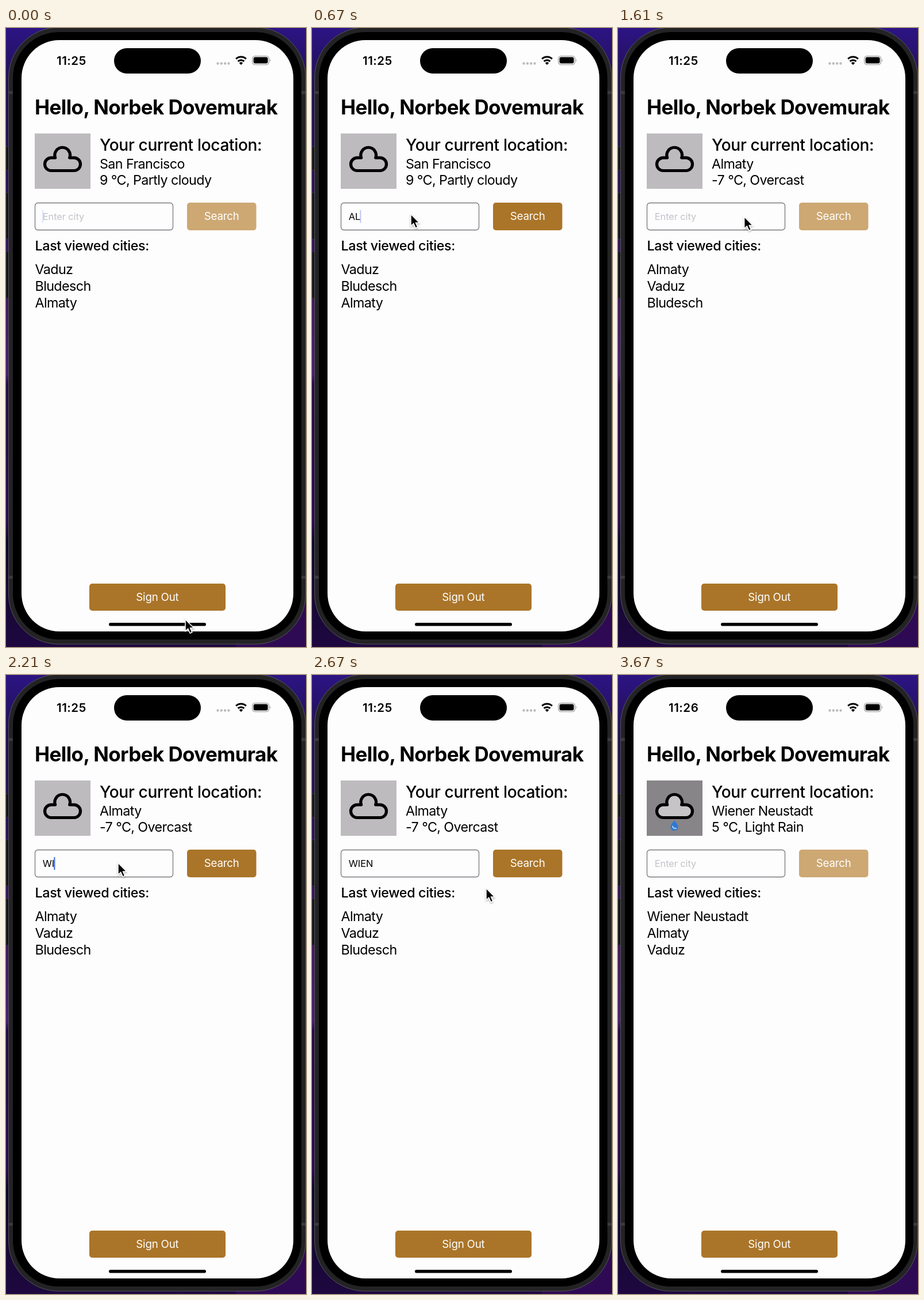
Recreate the animation shown at these times as an HTML page. Size 522 by 1074 pixels, loop 3700 ms.

```html
<!DOCTYPE html>
<html lang="en">
<head>
<meta charset="utf-8">
<style>
  html, body { margin: 0; width: 100%; height: 100%; overflow: hidden; background: #1e0840; }
  svg { display: block; width: 522px; height: 1074px; }
  text { font: 400 23.3px Inter, sans-serif; font-optical-sizing: none; letter-spacing: -.6px; white-space: pre; }
  .title { font-size: 35px; font-weight: 700; letter-spacing: -.6px; }
  .head { font-size: 28.1px; font-weight: 500; letter-spacing: -.35px; }
  .sub { font-weight: 500; letter-spacing: -.36px; }
  .clock { font-size: 20.5px; font-weight: 600; letter-spacing: .5px; }
  .button { font-size: 18.7px; letter-spacing: -.2px; fill: #fff; text-anchor: middle; }
  .field { font-size: 16.4px; letter-spacing: -.1px; }
</style>
</head>
<body>
<svg viewBox="0 0 522 1074">
  <defs>
    <linearGradient id="wall" x2="0" y2="1">
      <stop offset="0" stop-color="#2c1484"/>
      <stop offset=".1" stop-color="#20104f"/>
      <stop offset=".3" stop-color="#2c1258"/>
      <stop offset=".45" stop-color="#43185f"/>
      <stop offset=".56" stop-color="#4b1d73"/>
      <stop offset=".575" stop-color="#260a45"/>
      <stop offset=".8" stop-color="#2c0a50"/>
      <stop offset=".83" stop-color="#0d0726"/>
      <stop offset="1" stop-color="#1e0840"/>
    </linearGradient>
    <filter id="soft"><feGaussianBlur stdDeviation=".6"/></filter>
    <filter id="shadow" x="-50%" y="-50%" width="200%" height="200%">
      <feDropShadow dx="0" dy="1.5" stdDeviation="1.5" flood-opacity=".35"/>
    </filter>
  </defs>

  <rect width="522" height="1074" fill="url(#wall)"/>
  <rect x="400" y="900" width="122" height="174" fill="#2f0a54"/>
  <path d="M0 206H5V247H0ZM0 286H5V366H0ZM0 388H5V469H0Z" fill="#141318" stroke="#34323a"/>
  <rect x="4.5" y="-1" width="517" height="1070" rx="87" fill="#232325" stroke="#56545a"/>
  <path d="M5 112h8M5 953h8M513 112h8M513 953h8" stroke="#3b3a3d" stroke-width="5"/>
  <rect x="12" y="7" width="502" height="1054" rx="80"/>
  <rect x="27" y="21" width="473" height="1026" rx="66" fill="#fefdfe"/>

  <text id="clock" class="clock" x="88" y="63.6"/>
  <rect x="188" y="35" width="151" height="44" rx="22"/>
  <path d="M368.5 61.5h.01m6.3 0h.01m6.3 0h.01m6.3 0h.01" stroke="#bcbbbe" stroke-width="4.4" stroke-linecap="round"/>
  <g fill="none" stroke="#000" stroke-width="3">
    <path d="M400.2 53.6a12.6 12.6 0 0 1 17.6 0M403.6 57.8a7.8 7.8 0 0 1 10.8 0"/>
    <path d="M409 64l-3.2-3.3a4.4 4.4 0 0 1 6.4 0Z" fill="#000" stroke="none"/>
  </g>
  <rect x="428.6" y="48.6" width="29" height="15" rx="4.8" fill="none" stroke="#a3a2a5" stroke-width="1.3"/>
  <rect x="430.6" y="50.6" width="25" height="11" rx="3"/>
  <path d="M459.3 53.5q2.4 2.6 0 5.2Z" fill="#a3a2a5"/>

  <text class="title" x="50" y="150">Hello, Norbek Dovemurak</text>
  <rect id="tile" x="50" y="183" width="97" height="96"/>
  <g filter="url(#soft)">
    <path id="cloud" d="M78.7 247.5a11.2 11.2 0 0 1 0-22.4H85.7A13.3 13.3 0 1 1 110.7 225.1H118.3a11.2 11.2 0 0 1 0 22.4Z" stroke="#000" stroke-width="5.2" stroke-linejoin="round"/>
  </g>
  <g id="drop">
    <path d="M98 252.5q6.6 7 6.6 11.2a6.6 6.3 0 0 1-13.2 0q0-4.2 6.6-11.2Z" fill="#2f78d2"/>
    <path d="M95 262.5q1 4.5 6 3.5" fill="none" stroke="#a9d2f5" stroke-width="2" stroke-linecap="round"/>
  </g>

  <text class="head" x="163" y="213">Your current location:</text>
  <text id="city" x="163" y="243.6"/>
  <text id="weather" x="163" y="272.4"/>

  <rect x="50.5" y="303.5" width="240" height="47" rx="5" fill="none" stroke="#79777c" stroke-width="1.3"/>
  <text id="field" class="field" x="63.8" y="333"/>
  <rect id="caret" y="316" width="2" height="22" fill="#3d62dd"/>
  <rect id="search" x="315" y="303" width="120.5" height="48" rx="5"/>
  <text class="button" x="375.2" y="333.4">Search</text>

  <text class="sub" x="50.5" y="386">Last viewed cities:</text>
  <text id="row0" x="50.5" y="427"/>
  <text id="row1" x="50.5" y="455.8"/>
  <text id="row2" x="50.5" y="484.6"/>

  <rect x="145" y="964" width="237" height="47" rx="5" fill="#aa7529"/>
  <text class="button" x="263.4" y="994.3">Sign Out</text>
  <rect x="179" y="1032" width="169" height="5.6" rx="2.8"/>

  <g id="pointer" filter="url(#shadow)">
    <path d="M0 0V20.5L4.7 16.2L8.2 24L11.8 22.5L8.5 14.9H14.8Z" stroke="#fff" stroke-width="1.5"/>
  </g>
</svg>
<script>
const LOOP = 3700;
const el = id => document.getElementById(id);

const results = [
  { at: 0, city: 'San Francisco', weather: '9 °C, Partly cloudy', rows: ['Vaduz', 'Bludesch', 'Almaty'] },
  { at: 1350, city: 'Almaty', weather: '-7 °C, Overcast', rows: ['Almaty', 'Vaduz', 'Bludesch'] },
  { at: 2900, city: 'Wiener Neustadt', weather: '5 °C, Light Rain', rows: ['Wiener Neustadt', 'Almaty', 'Vaduz'], rain: true }
];
const entries = [
  { word: 'ALMATY', start: 600, step: 60, end: 1350 },
  { word: 'WIEN', start: 2130, step: 65, end: 2900 }
];
// time, x, y of the pointer tip
const path = [
  [0, 312, 1026], [60, 312, 1026], [480, 172, 323], [880, 172, 323],
  [1120, 357, 336], [1400, 357, 336], [1680, 195, 326], [2420, 195, 326],
  [2670, 303, 370], [2780, 352, 334], [2930, 352, 334], [3090, 282, 345], [3270, 272, 352]
];

function pointerAt(t) {
  const i = path.findIndex(p => p[0] > t);
  if (i < 0) return path[path.length - 1].slice(1);
  const [t0, x0, y0] = path[i - 1], [t1, x1, y1] = path[i];
  const u = (t - t0) / (t1 - t0), k = u * u * (3 - 2 * u);
  return [x0 + (x1 - x0) * k, y0 + (y1 - y0) * k];
}

function typedAt(t) {
  const entry = entries.find(e => t >= e.start && t < e.end);
  return entry ? entry.word.slice(0, Math.floor((t - entry.start) / entry.step) + 1) : '';
}

function setText(id, value) {
  if (el(id).textContent !== value) el(id).textContent = value;
}

function draw(t) {
  const result = results.filter(r => r.at <= t).pop();
  const typed = typedAt(t);
  const pressed = (t > 1150 && t < 1300) || (t > 2810 && t < 2900);
  const focused = t < 1100 || (t > 1720 && t < 2640);

  setText('clock', t < 2850 ? '11:25' : '11:26');
  setText('city', result.city);
  setText('weather', result.weather);
  result.rows.forEach((name, i) => setText('row' + i, name));
  el('tile').setAttribute('fill', result.rain ? '#878588' : '#bdbbbe');
  el('cloud').setAttribute('fill', result.rain ? '#c6c4c7' : 'none');
  el('drop').setAttribute('opacity', result.rain ? 1 : 0);

  setText('field', typed || 'Enter city');
  el('field').setAttribute('fill', typed ? '#000' : '#c3c2c8');
  el('search').setAttribute('fill', !typed ? '#cda873' : pressed ? '#b17f36' : '#aa7529');
  el('caret').setAttribute('x', 63 + (typed ? el('field').getComputedTextLength() : 0));
  el('caret').setAttribute('opacity', focused ? .55 + .45 * Math.cos((t - 2210) / 920 * 2 * Math.PI) : 0);

  el('pointer').setAttribute('transform', `translate(${pointerAt(t)})`);
  el('pointer').setAttribute('opacity', t < 3360 ? 1 : 0);
}

const begin = performance.now();
function tick() {
  draw((performance.now() - begin) % LOOP);
  requestAnimationFrame(tick);
}
tick();
</script>
</body>
</html>
```
